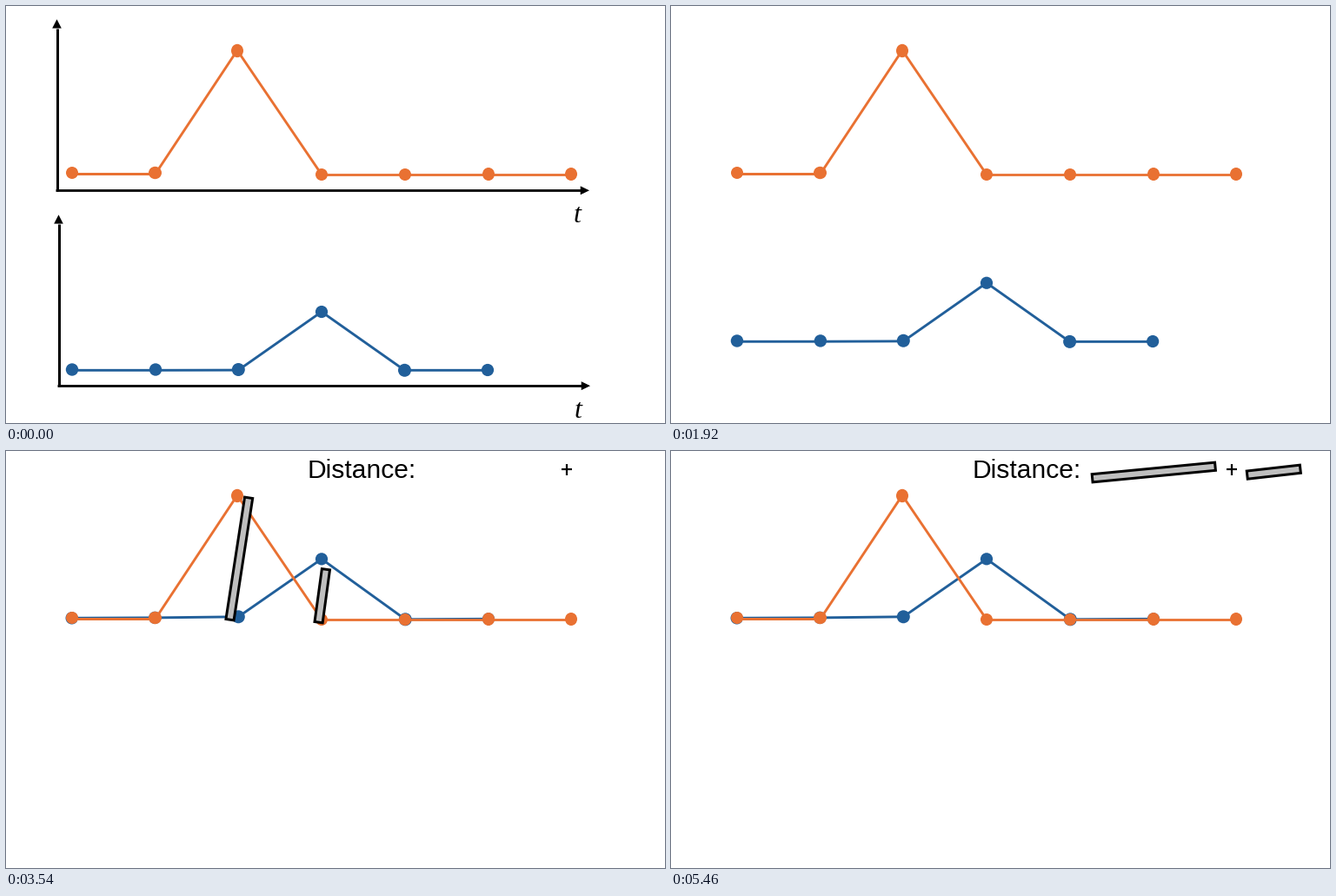
Write a matplotlib script that moves like this. It is 758 by 480 pixels and loops after 5520 ms.

```python
import numpy as np
import matplotlib.pyplot as plt
from matplotlib.animation import FuncAnimation
from matplotlib.patches import Ellipse, Polygon

W, H, DPI = 758, 480, 100
FRAMES, STEP = 92, 60
PX = 72 / DPI
ORANGE, BLUE, GREY = "#E97132", "#215F9A", "#BFBFBF"

FADE_LEN = 25
LIFT_START, LIFT_LEN = 26, 24
LABELS_AT = 52
SPIN_FROM, SPIN_TO = 85.5, 5
MOVE_LEN = 34

fig = plt.figure(figsize=(W / DPI, H / DPI), dpi=DPI, facecolor="white")
ax = fig.add_axes([0, 0, 1, 1])
ax.set_xlim(0, W)
ax.set_ylim(H, 0)
ax.axis("off")


def line(pts, color, width, z):
    xs, ys = zip(*pts)
    return ax.plot(xs, ys, color=color, lw=width * PX, zorder=z,
                   solid_capstyle="butt", solid_joinstyle="round")[0]


def dot(x, y, rx, ry, color, z):
    return ax.add_patch(Ellipse((x, y), 2 * rx, 2 * ry, fc=color, lw=0, zorder=z))


def text(x, y, s, size, family, **kw):
    return ax.text(x, y, s, fontsize=size * PX, family=family, zorder=8, **kw)


def axes_pair(x, y, top, right):
    """Two arrows from one corner, with the time label."""
    up = [(x, top), (x - 5.3, top + 10.3), (x + 5.3, top + 10.3)]
    across = [(right, y), (right - 10.3, y - 5), (right - 10.3, y + 5)]
    parts = [line([(x, y + 1), (x, top + 10.3)], "black", 3, 1),
             line([(x - 1.2, y), (right - 10.3, y)], "black", 2.8, 1)]
    parts += [ax.add_patch(Polygon(p, fc="black", lw=0, zorder=1)) for p in (up, across)]
    parts.append(text(right - 14, y + 36.3, "t", 32, "Liberation Serif",
                      style="italic", ha="center", va="baseline"))
    return parts


axes_parts = axes_pair(58.5, 212.3, 15.3, 671) + axes_pair(60.5, 437.2, 240.3, 672)

# Orange series
peak = [(172, 193), (266, 51), (363, 194)]
line([(76, 193.3), (172, 193.3)], ORANGE, 3, 4)
line(peak, ORANGE, 2.9, 4)
line([(363, 194.4), (650, 194.4)], ORANGE, 2.8, 4)
for spot in [(76, 192, 7, 7), (171.5, 192, 7.5, 7.2), (266, 51.5, 7, 7.7),
             (363, 194, 7, 7), (459, 194, 7, 7), (555, 193.5, 7, 7.5),
             (650, 193.5, 7, 7.5)]:
    dot(*spot, ORANGE, 5)

# Blue series: resting pose and lifted pose
LOW = np.array([(76, 418.5), (172, 418.5), (267.3, 418.5),
                (363, 352), (458.5, 419.3), (554, 419)])
HIGH = np.array([(75.7, 193), (171.3, 192.6), (267.3, 191.5),
                 (363, 125), (459.3, 194.5), (555, 194)])
SAG = np.array([0.8, 0.8, 0.6, 0, 0, 0.3])
blue_line = line(LOW, BLUE, 2.9, 2)
blue_dots = [dot(x, y, r, r, BLUE, 3)
             for (x, y), r in zip(LOW, (7.2, 7.2, 7.5, 7.1, 7.5, 7.1))]

labels = [text(346.3, 31, "Distance:", 30, "Liberation Sans", va="baseline"),
          line([(639, 21.3), (651.4, 21.3)], "black", 2.2, 8),
          line([(645.2, 15.2), (645.2, 27.5)], "black", 2.2, 8)]


def turn_path(start, end, n=120):
    """Straight, quarter bend, straight; with travelled length along it."""
    t = np.linspace(0, 1, n)
    a, b, c = 3 * (1 - t) ** 2 * t, 3 * (1 - t) * t ** 2, t ** 3
    bend_x, bend_y = 0.448 * a + b + c, 0.552 * b + c
    x = np.concatenate([t, 1 + bend_x, np.full(n, 2)]) / 2
    y = np.concatenate([0 * t, bend_y, 1 + t]) / 2
    dx, dy = end[0] - start[0], end[1] - start[1]
    # lengths are measured in slide units, 16:9
    steps = np.hypot(np.diff(x) * dx, np.diff(y) * dy * 16 / 9)
    dist = np.concatenate([[0], np.cumsum(steps)])
    return start[0] + x * dx, start[1] + y * dy, dist / dist[-1]


class Bar:
    def __init__(self, start, end, length, begin):
        self.path = turn_path(start, end)
        self.half, self.begin = length / 2, begin
        self.patch = ax.add_patch(Polygon(np.zeros((4, 2)), fc=GREY, ec="black",
                                          lw=3 * PX, joinstyle="miter", zorder=7))

    def place(self, k):
        u = np.clip((k - self.begin) / MOVE_LEN, 0, 1)
        s = 2 * u * u if u < 0.5 else 1 - 2 * (1 - u) ** 2
        xs, ys, dist = self.path
        centre = np.array([np.interp(s, dist, xs), np.interp(s, dist, ys)])
        ang = np.radians(SPIN_FROM + (SPIN_TO - SPIN_FROM) * u)
        along = self.half * np.array([np.cos(ang), -np.sin(ang)])
        side = 4.6 * np.array([np.sin(ang), np.cos(ang)])
        self.patch.set_xy([centre + along + side, centre + along - side,
                           centre - along - side, centre - along + side])


bars = [Bar((266, 124), (555.3, 24.5), 142, 57.2),
        Bar((362, 166.7), (693.3, 24), 61.5, 57.6)]


def draw(k):
    fade = max(0, 1 - k / FADE_LEN)
    for part in axes_parts:
        part.set_alpha(fade)

    u = np.clip((k - LIFT_START) / LIFT_LEN, 0, 1)
    pts = LOW + (HIGH - LOW) * (1 - np.cos(np.pi * u)) / 2
    shown = k >= LABELS_AT
    if shown:
        pts = pts - [0, 0.7]
    blue_line.set_data(pts[:, 0], pts[:, 1] + SAG * (0 if shown else 1))
    for d, p in zip(blue_dots, pts):
        d.set_center(p)

    for label in labels:
        label.set_visible(shown)
    for bar in bars:
        bar.patch.set_visible(shown)
        bar.place(k)
    return []


anim = FuncAnimation(fig, draw, frames=FRAMES, interval=STEP,
                     init_func=lambda: draw(0), repeat=True, repeat_delay=0)
plt.show()
```
